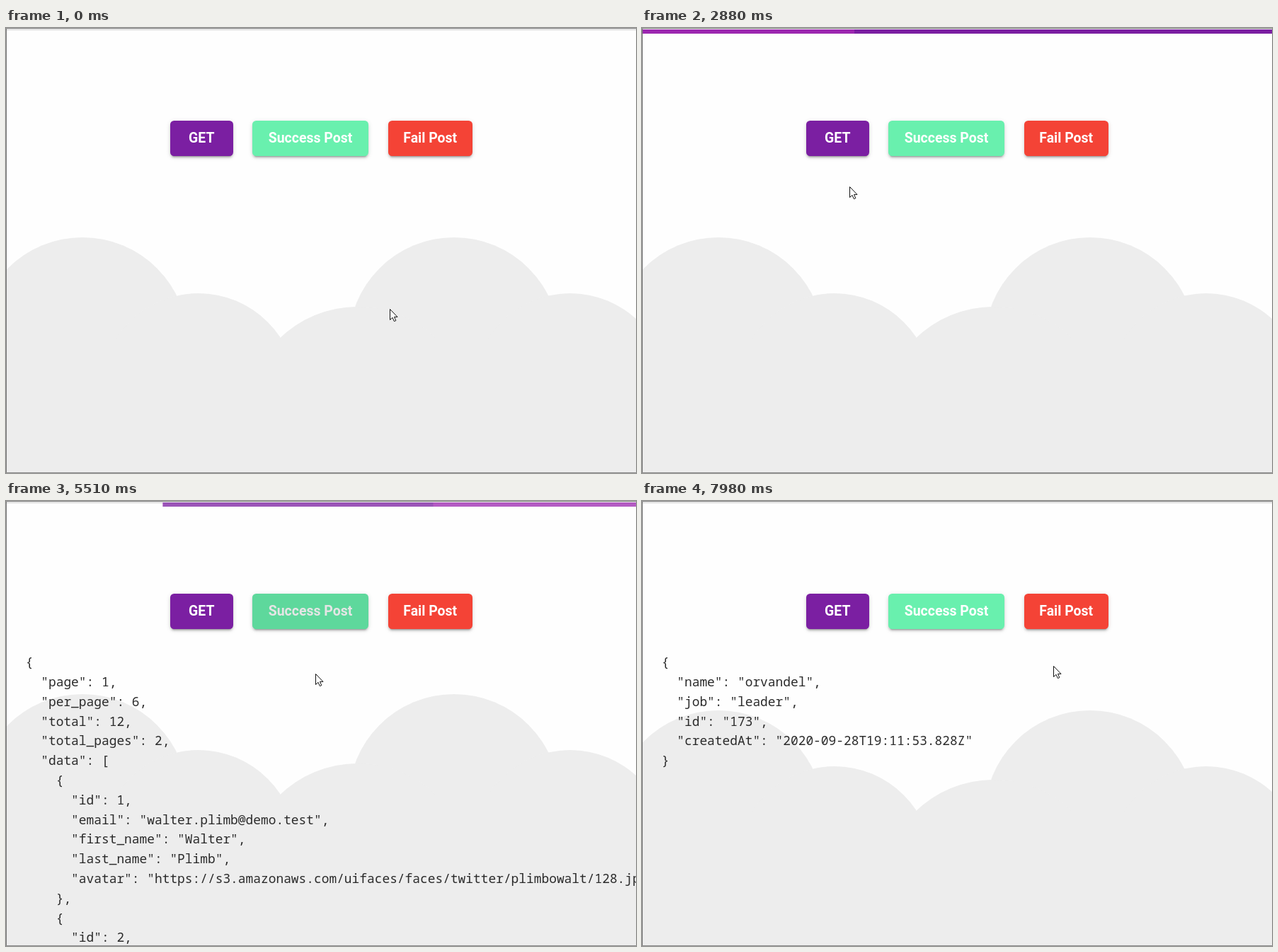
Animation, 890 px wide and 629 px high, one loop 8000 ms. Source, as an HTML page:

```html
<!DOCTYPE html>
<html lang="en">
<head>
<meta charset="utf-8">
<title>Request demo</title>
<style>
  html, body, #stage { margin: 0; width: 100%; height: 100%; overflow: hidden; background: #fefefe; }
  #stage { position: relative; }
  svg, pre, i, .bar, .button { position: absolute; }
  svg { left: 0; top: 0; width: 890px; height: 629px; overflow: hidden; }
  pre { margin: 0; left: 27.8px; top: 214.2px; color: #2b2b2b;
        font: 17.87px/27.8px "Noto Sans Mono", "DejaVu Sans Mono", monospace; }
  .bar { left: 1px; top: 2px; width: 889px; height: 6px; overflow: hidden; background: #9c27b0; }
  .bar i { height: 100%; background: #7b1fa2; }
  .button { top: 131px; height: 50px; border-radius: 5.5px; color: #fff; text-align: center;
            font: 600 19.44px/50px Roboto, sans-serif; white-space: nowrap;
            box-shadow: 0 4px 1.4px -2.8px rgba(0,0,0,.2), 0 2.8px 2.8px rgba(0,0,0,.14),
                        0 1.4px 7px rgba(0,0,0,.12); }
  .button i { inset: 0; border-radius: inherit; }
  #top { z-index: 1; }
</style>
</head>
<body>
<div id="stage">
  <svg><g id="clouds" fill="#ededed"></g></svg>
  <pre id="json"></pre>
  <svg>
    <path d="M.5 629V.5H890" fill="none" stroke="#777"/>
    <path d="M1 2.5H890" stroke="#ccc"/>
    <path d="M0 628.5H890" stroke="#8c8c8c"/>
  </svg>
  <svg id="top">
    <g id="cursor" fill="#fff" stroke="#111" stroke-linejoin="round">
      <path id="arrow" d="M.5.5V15.5L4 12.3 6.4 17.6 8.8 16.6 6.5 11.4H11Z"/>
      <path id="hand" d="M-2 2Q0-1.5 2 2V8Q4 6.5 5 8.5 7 7.5 7.5 9.5 9 9 8.5 12V15Q8.5 18 7 20V22H-2V20L-6 13.5Q-7 10.5-4.5 11.5L-2 13.5Z"/>
    </g>
  </svg>
</div>
<script>
const LOOP = 8000, LIST_AT = 3270, POST_AT = 6410;
const $ = id => document.getElementById(id);
const clamp = v => Math.max(0, Math.min(1, v));
const smooth = v => v * v * (3 - 2 * v);

const listReply = `{
  "page": 1,
  "per_page": 6,
  "total": 12,
  "total_pages": 2,
  "data": [
    {
      "id": 1,
      "email": "walter.plimb@demo.test",
      "first_name": "Walter",
      "last_name": "Plimb",
      "avatar": "https://s3.amazonaws.com/uifaces/faces/twitter/plimbowalt/128.jpg"
    },
    {
      "id": 2,`;
const postReply = `{
  "name": "orvandel",
  "job": "leader",
  "id": "173",
  "createdAt": "2020-09-28T19:11:53.828Z"
}`;

function add(tag, parent, cls = '') {
  const el = document.createElement(tag);
  el.className = cls;
  return parent.appendChild(el);
}

// Three clouds, repeated every 525 px
const cloud = (x, top, r) => [0, 525].map(dx => `<circle cx="${x + dx}" cy="${top + r}" r="${r}"/>`).join('');
$('clouds').innerHTML = cloud(108, 296, 149) + cloud(272, 375, 138) + cloud(497, 394, 159) +
  '<rect y="440" width="890" height="220"/>';

const buttons = [
  { label: 'GET', x: 231.5, w: 89.5, color: '#7b1fa2', ink: '#fff', press: 1900 },
  { label: 'Success Post', x: 348, w: 164, color: '#69f0ae', ink: '#000', press: 5040 },
  { label: 'Fail Post', x: 539.5, w: 119.5, color: '#f44336', ink: '#000', press: LOOP }
];
for (const b of buttons) {
  b.el = add('div', $('stage'), 'button');
  b.el.textContent = b.label;
  b.el.style.cssText = `left:${b.x}px;width:${b.w}px;background:${b.color}`;
  b.ripple = add('i', b.el);
  b.ripple.style.background = b.ink;
}

// Head and tail of the two runners of a busy bar, by seconds since it appeared
const runners = [
  { head: s => 1.28 * (s - .04), tail: s => late(s, .42, .5, .5) },
  { head: s => late(s, 1.09, 2.6, -1.2), tail: s => late(s, 1.42, 2.5, -1.3) }
];
function late(s, start, speed, gain) {
  const u = Math.max(0, s - start);
  return speed * u + gain * u * u;
}

// Each request slides its bar in from the right and back out
const bars = [[2001, 3114], [5135, 6348], [6348, 7480]].map(([enter, leave]) => {
  const el = add('div', $('stage'), 'bar');
  return { enter, leave, el, fills: runners.map(() => add('i', el)) };
});

function drawBar({ enter, leave, el, fills }, t) {
  const shown = clamp((t - enter) / 500) - clamp((t - leave) / 450);
  el.style.opacity = shown;
  el.style.transform = `translateX(${(1 - shown) * 100}%)`;
  const s = Math.max(0, t - enter) / 1000 % 2;
  runners.forEach(({ head, tail }, n) => {
    const from = clamp(tail(s)), to = clamp(head(s));
    fills[n].style.left = from * 100 + '%';
    fills[n].style.width = Math.max(0, to - from) * 100 + '%';
  });
}

function drawRipple({ press, ripple }, t) {
  const age = t - press;
  ripple.style.opacity = age < 0 ? 0 : .1 * (1 - clamp((age - 480) / 400));
  ripple.style.clipPath = `circle(${Math.max(0, 20 + age * .6)}px at 45% 60%)`;
}

// Cursor moves: start, end, destination
const moves = [
  [640, 1060, 296, 280], [1060, 1550, 268, 154], [2220, 2700, 293, 224],
  [4030, 4570, 418, 166], [5240, 5560, 438, 249], [7180, 7980, 581, 233]
];

function drawCursor(t) {
  let x = 542, y = 397;
  for (const [start, end, toX, toY] of moves) {
    const f = smooth(clamp((t - start) / (end - start)));
    x += (toX - x) * f;
    y += (toY - y) * f;
  }
  const over = y > 131 && y < 181 && buttons.some(b => x > b.x && x < b.x + b.w);
  $('cursor').setAttribute('transform', `translate(${Math.round(x)} ${Math.round(y)})`);
  $('hand').style.display = over ? '' : 'none';
  $('arrow').style.display = over ? 'none' : '';
}

function draw(t) {
  const text = t < LIST_AT ? '' : t < POST_AT ? listReply : postReply;
  if ($('json').textContent !== text) $('json').textContent = text;
  $('clouds').setAttribute('transform', `translate(0 ${text === listReply ? -23 : 0})`);
  bars.forEach(bar => drawBar(bar, t));
  buttons.forEach(b => drawRipple(b, t));
  drawCursor(t);
}

const start = performance.now();
(function loop() {
  draw((performance.now() - start) % LOOP);
  requestAnimationFrame(loop);
})();
</script>
</body>
</html>
```
